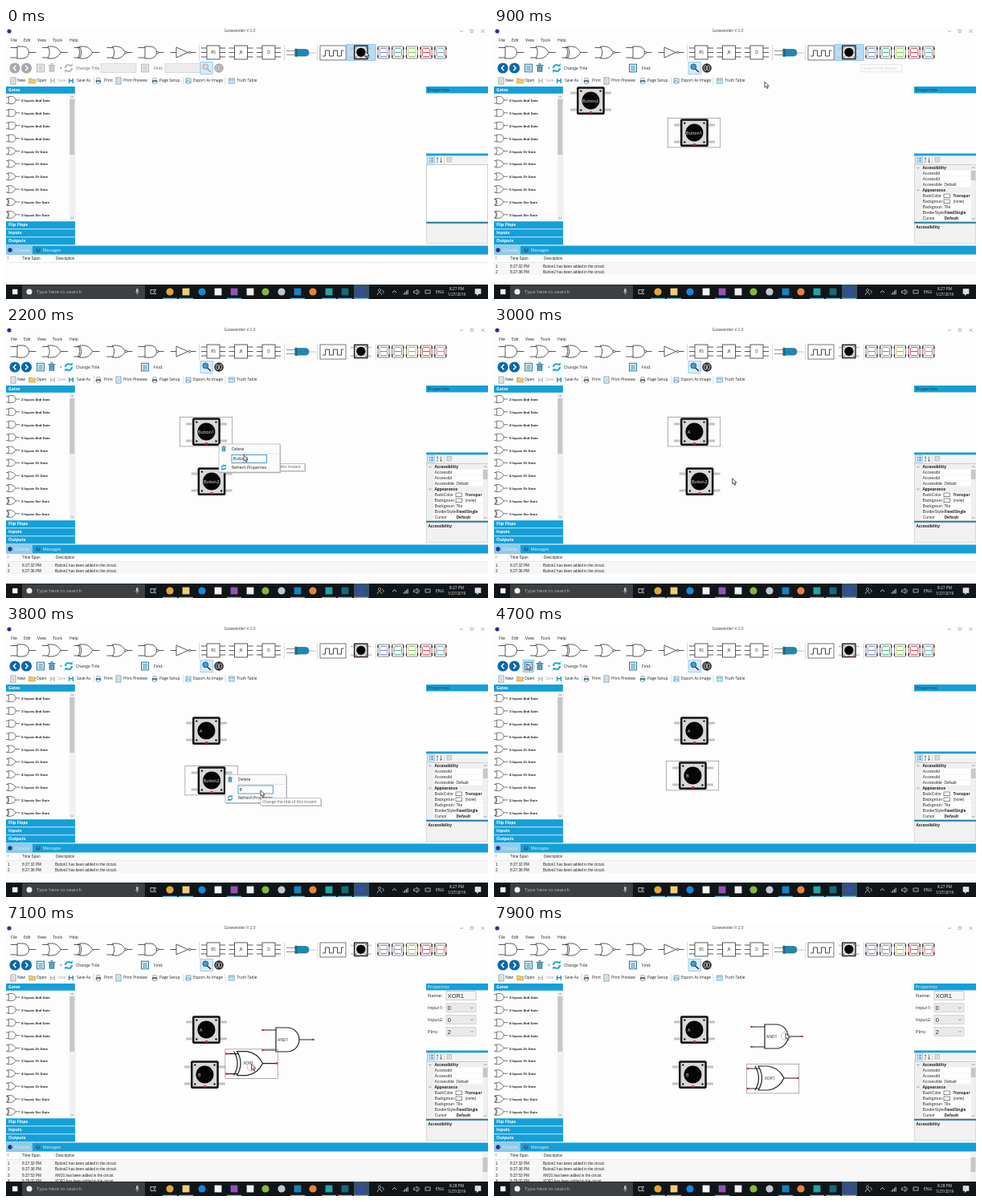
Recreate the animation shown at these times as an HTML page. Size 600x338 px, loop 8 s.

```html
<!DOCTYPE html>
<html lang="en">
<head>
<meta charset="utf-8">
<title>Logic circuit editor</title>
<style>
html, body { margin: 0; width: 100%; height: 100%; overflow: hidden; background: #fdfdfd; }
svg { display: block; width: 100vw; height: 100vh; font-family: "Open Sans", "Noto Sans", sans-serif; }
text { white-space: pre; }
</style>
</head>
<body>
<svg viewBox="0 0 600 338" preserveAspectRatio="none">
  <g id="base"></g><g id="live"></g><g id="bar"></g><g id="top"></g>
</svg>
<script>
const LOOP = 8000, STEP = 100;
const BLUE = '#149fd8', INK = '#222', GREY = '#a8a8a8', PAPER = '#fdfdfd';
const $ = id => document.getElementById(id);

// Drawing helpers
const rect = (x, y, w, h, fill, stroke = 'none', sw = .6, rx = 0) =>
  `<rect x="${x}" y="${y}" width="${w}" height="${h}" fill="${fill}" stroke="${stroke}" stroke-width="${sw}" rx="${rx}"/>`;
const circle = (x, y, r, fill, stroke = 'none', sw = .6) =>
  `<circle cx="${x}" cy="${y}" r="${r}" fill="${fill}" stroke="${stroke}" stroke-width="${sw}"/>`;
const path = (d, stroke = INK, sw = .7, fill = 'none') =>
  `<path d="${d}" fill="${fill}" stroke="${stroke}" stroke-width="${sw}"/>`;
const text = (x, y, s, size = 4.9, fill = INK, extra = '') =>
  `<text x="${x}" y="${y + size * .36}" font-size="${size}" fill="${fill}" ${extra}>${s}</text>`;
const bold = (x, y, s, size = 4.9, fill = INK) => text(x, y, s, size, fill, 'font-weight="700"');
const sans = (x, y, s, size = 4.7, fill = INK) => text(x, y, s, size, fill, 'font-family="Liberation Sans, sans-serif"');
const at = (x, y, s, body) => `<g transform="translate(${x} ${y}) scale(${s})">${body}</g>`;
const chevron = (x, y, c = '#555') => path(`M${x - 1.7} ${y - .8}l1.7 1.7l1.7-1.7`, c, .6);

// Components are drawn in a 66 x 37 cell
const SHAPES = {
  and: 'M18 3H32A15 15 0 0 1 32 33H18Z',
  or: 'M15 3H27Q41 5 47 18Q41 31 27 33H15Q24 18 15 3Z',
  not: 'M16 5L45 18L16 31Z'
};
function gate(kind, sw = 1.3) {
  const negated = /^n/.test(kind);
  const shape = kind === 'not' ? 'not' : kind.includes('and') ? 'and' : 'or';
  const wires = shape === 'not' ? 'M1 18H16' : 'M1 6H18M1 31H18';
  return path(wires + `M${negated ? 52 : 47} 18H65`, '#222', sw)
    + path(SHAPES[shape], '#222', sw, '#fff')
    + (kind === 'xor' ? path('M11 3Q20 18 11 33', '#222', sw) : '')
    + (negated ? circle(49, 18, 2.7, '#fff', '#222', sw) : '');
}
function pushButton(label) {
  return path('M8 9H17M8 30H17M50 9H59M50 30H59', '#c2c2c2', 3)
    + rect(16, 1.3, 34.8, 34.6, '#141414', 'none', 0, 2) + rect(18.5, 3.8, 29.8, 29.6, '#d9d9d9')
    + [[21.3, 6.6], [45.5, 6.6], [21.3, 30.4], [45.5, 30.4]].map(p => circle(...p, 1.2, '#111')).join('')
    + circle(33.4, 18.5, 11, '#060606') + rect(32, 32.2, 3.2, 2.6, '#d8232a')
    + text(label.length > 1 ? 23.1 : 25, 19, label, 5.3, '#f2f2f2');
}
const placedGate = (kind, label) => gate(kind, 1.2)
  + [[1.5, 6], [1.5, 31], [64.5, 18]].map(p => circle(...p, 1.3, '#e02020')).join('')
  + text(kind === 'xor' ? 23 : 20, 18, label, 5);
const placed = (pos, body, selected) =>
  at(pos[0], pos[1], 1, body + (selected ? rect(.3, .3, 65.4, 36.6, 'none', '#8c8c8c', .7) : ''));

// Small toolbar icons
const sheet = (x, y, c) => rect(x - 3, y - 4, 6, 8, '#fff', c, .7) + path(`M${x - 1.7} ${y - 1.7}h3.4m-3.4 1.8h3.4m-3.4 1.8h3.4`, c, .5);
const board = (x, y, c) => rect(x - 4.5, y - 4.8, 9, 9.6, '#e6f2f9', c, 1) + path(`M${x - 2.8} ${y - 2}h5.6m-5.6 2.2h5.6m-5.6 2.2h5.6`, c, .9);
const disk = (x, y, c) => rect(x - 3, y - 3, 6, 6, c, 'none', 0, .5) + rect(x - 1.5, y - 3, 3, 2, '#fff') + rect(x - 1.8, y + .4, 3.6, 2.6, '#e8f4fb');
const printer = (x, y) => rect(x - 2, y - 3.2, 4, 2.5, '#fff', '#555', .5) + rect(x - 3.2, y - .9, 6.4, 3, '#47748f') + rect(x - 2, y + .8, 4, 2.4, '#fff', '#555', .5);
const trash = (x, y, c, k = 1) => at(x, y, k, path('M-3.2 -2.4h6.4m-4.4-1.4h2.4', c, 1.1) + rect(-2.4, -1.5, 4.8, 5, c) + path('M-.8 -1v4m1.6-4v4', '#fff', .5));
const cycle = (x, y, r, c) => path(`M${x - r} ${y}a${r} ${r} 0 0 1 ${1.7 * r} ${-.7 * r}M${x + r} ${y}a${r} ${r} 0 0 1 ${-1.7 * r} ${.7 * r}`, c, r * .55)
  + path(`M${x + r * .2} ${y - r * .5}h${r}v${-r}zM${x - r * .2} ${y + r * .5}h${-r}v${r}z`, 'none', 0, c);
const bar = (x, y, h) => path(`M${x} ${y}v${h}`, '#c4c4c4', .6);
const navDisc = (x, c, d) => circle(x, 50, 6.6, c) + path(`M${x - 1.4 * d} 46.8l${3 * d} 3.2l${-3 * d} 3.2`, '#fff', 1.5);

// A seven segment display: a on the bars, b on the sides
function digit(x, a, b) {
  return rect(x - 7, 23, 14, 15, '#fdfdfd', '#555', .7)
    + path(`M${x - 4} 25.3h8m-8 5.2h8m-8 5.2h8`, a, 1) + path(`M${x - 4.7} 26v9.3m9.4-9.3v9.3`, b, 1)
    + path(`M${x - 7} 24v3m0 7v3M${x + 7} 24v3m0 7v3`, '#222', 1.2);
}

function drawBase() {
  let s = rect(0, 0, 600, 338, PAPER);
  s += circle(4, 4, 2.6, '#27358c') + text(291, 3.2, 'Gatewelden V 2.0', 4.8, '#444', 'text-anchor="middle"')
    + path('M565 4h4M591.5 2l4 4m0-4l-4 4', '#777', .6) + rect(578.5, 2.7, 3, 3, 'none', '#777', .5);
  [['File', 6], ['Edit', 22], ['View', 39], ['Tools', 58], ['Help', 79]].forEach(([w, x]) => s += text(x, 14.7, w, 5));

  [['and', 5], ['or', 44.5], ['xor', 84], ['nor', 125], ['nand', 164], ['not', 204]]
    .forEach(([kind, x]) => s += at(x, 21.5, .5, gate(kind, 1.5)));
  [240.5, 346.5, 387.5, 460.5].forEach(x => s += bar(x, 21, 20));
  [['RS', 258], ['JK', 292.5], ['D', 327]].forEach(([w, x]) => {
    s += path(`M${x - 15} 25h30m-30 5.5h30m-30 5.5h30`, '#333', .8) + rect(x - 8, 22, 16, 17, '#fff', '#333', .8)
      + text(x, 30.5, w, 4.8, INK, 'text-anchor="middle"');
  });
  s += path('M349 28.5h12m-12 5h12', '#666', .7) + path('M377 31h9', '#aaa', .7)
    + path('M361 26.5h11.5q4.5 0 4.5 4.3t-4.5 4.3h-11.5z', '#176885', .6, '#2187ad') + rect(359.5, 25.8, 3, 10, '#176885');
  s += rect(391, 22, 32, 18, '#fff', '#555', .8) + path('M394 35h3.5v-7h5v7h5v-7h5v7h5v-7h3', '#333', .9);
  [['#7486d6', '#a2a5ce'], ['#4ab07a', '#9b82c4'], ['#7abf55', '#d0ce50'], ['#e33e55', '#d5536c'], ['#4fbfc1', '#e27878']]
    .forEach((c, i) => s += digit(470 + i * 17.7, ...c));

  s += sheet(9, 66, '#777') + path('M28.5 69v-6h3l1 1h4v5z', '#b28a32', .5, '#ecc968') + disk(58, 66, '#bcbcbc')
    + disk(81, 66, '#248fc4') + printer(115, 66) + sheet(140, 66, '#47748f') + printer(185, 66)
    + rect(224, 63, 6, 6, '#d8eef7', '#367fa2') + path('M224 68l2-3l1.5 2l1-1l1.5 2', '#367fa2', .6)
    + rect(277.5, 63, 7, 6, '#fff', '#367fa2') + path('M277.5 65h7m-4.7-2v6m2.4-6v6', '#367fa2', .5);
  [['New', 14], ['Open', 38], ['Save', 64], ['Save As', 88], ['Print', 122], ['Print Preview', 146], ['Page Setup', 191],
   ['Export As Image', 233], ['Truth Table', 287]].forEach(([w, x]) => s += text(x, 65.7, w, 4.9, w === 'Save' ? GREY : INK));
  [109.5, 221, 273].forEach(x => s += bar(x, 61, 10));

  s += rect(0, 73, 86, 8.8, BLUE) + bold(3, 77.3, 'Gates', 5.1, '#fff') + path('M86 73v198', '#c9d8e0', .5);
  const names = ['And', 'Or', 'Xor'];
  for (let i = 0; i < 10; i++) {
    const name = names[i >> 2], y = 90 + i * 15.87;
    s += at(-2, y - 5.4, .3, gate(name.toLowerCase(), 2)) + bold(19, y + .6, `${i % 4 + 2} Inputs ${name} Gate`, 4.05);
  }
  s += rect(79, 83, 6.5, 158, '#f0f0f0') + rect(79.3, 89, 6, 69, '#c6c6c6') + chevron(82.3, 237) + path('M80.6 87l1.7-1.7l1.7 1.7', '#555', .6);
  ['Flip Flops', 'Inputs', 'Outputs'].forEach((w, i) => s += rect(0, 241.2 + i * 10, 86, 9.2, BLUE) + bold(3, 245.3 + i * 10, w, 5.2, '#fff'));

  s += rect(523, 73, 77, 8.4, BLUE) + rect(523, 156.5, 77, 3, BLUE) + rect(523, 159.5, 77, 11, '#f3f3f3')
    + rect(524.5, 160, 9, 9, '#cfe6f6', '#7cb7de') + path('M527 163h1m1 0h3m-5 3h1m1 0h3', '#335', .8)
    + text(536, 163, 'A', 3.2) + text(536, 166.5, 'Z', 3.2) + path('M541.5 161.5v6m-1.3-1.5l1.3 1.5l1.3-1.5', '#333', .6)
    + bar(545.5, 161, 8) + rect(549, 161.5, 5.5, 5.5, '#ddd', '#999', .5)
    + rect(523.4, 170.4, 76.4, 71, '#fff', '#aaa', .6) + rect(523, 242, 77, 1.8, '#1a78a8') + rect(523.4, 244, 76.4, 25, '#f1f1f1', '#bbb', .5);

  s += rect(0, 271.5, 600, 11, BLUE) + rect(0, 272, 33, 10.5, '#8fcae8') + circle(5, 277, 2.7, '#27358c')
    + text(11, 277, 'Console', 4.9, '#e4f5fd') + circle(40, 277, 2.7, '#20679b') + text(39.2, 277, '?', 4, '#fff')
    + text(46, 277, 'Messages', 4.9, '#eef8fd')
    + sans(2, 287.5, '!') + sans(20, 287.5, 'Time Span') + sans(62, 287.5, 'Description')
    + path('M0 292.6h600M18 283v10M59 283v10', '#d8d8d8', .5);
  return s;
}

function drawTaskbar() {
  let s = rect(0, 320, 600, 18, '#101519') + rect(8, 325.8, 6.4, 6.4, '#f4f4f4') + rect(20, 320.5, 153, 17.5, '#3c4043')
    + circle(29, 329, 3.5, '#f0f0f0') + text(38, 328.8, 'Type here to search', 6.15, '#b9b9b9')
    + rect(162, 325, 2.6, 5, '#bbb', 'none', 0, 1.3) + path('M160.8 329q2.5 4 5 0m-2.5 2v2', '#bbb', .6)
    + rect(180, 326.5, 4.2, 5, 'none', '#eee', .7) + path('M186 325.5v3m0 1.5v2.5', '#eee', .9) + rect(433, 320, 19, 18, '#34536b');
  [['c', 204, '#e2a832'], ['s', 224, '#f0cf70'], ['c', 244, '#1688d8'], ['s', 264, '#f4f4f4'], ['s', 284, '#9353b5'],
   ['s', 304, '#eeeeee'], ['c', 323, '#83b83d'], ['c', 343, '#bfc9d0'], ['s', 363, '#1483c1'], ['c', 382, '#e5853b'],
   ['s', 402, '#21a6a5'], ['s', 422, '#16697a'], ['c', 442, '#364cae']].forEach(([k, x, c]) =>
    s += k === 'c' ? circle(x, 329, 4.6, c) : rect(x - 4.4, 324.6, 8.8, 8.8, c));
  [204, 224, 284, 363, 402, 422, 442].forEach(x => s += rect(x - 9, 336.8, 18, 1.2, '#75b7e6'));
  s += circle(465, 327, 1.6, 'none', '#ddd') + path('M462 333q3-7 6 0m0-6q3 1 2 4', '#ddd', .7)
    + path('M481 330l2.5-2.5l2.5 2.5', '#eee', .8) + path('M495 332.5v-1.5m1.7 1.5v-3m1.7 3v-4.5m1.7 4.5v-6', '#ddd', .9)
    + path('M507.5 328h2l2.5-2v6.5l-2.5-2h-2zM513.5 327q2 2 0 4.5', '#ddd', .7) + rect(522, 327, 6, 4, 'none', '#ddd', .7)
    + text(535, 328.8, 'ENG', 5.1, '#eee')
    + path('M584 325.5h7v6h-2.6l-2 2v-2h-2.4z', '#ddd', .7, '#ddd');
  return s;
}

// Motion: [time, x, y] points joined with a soft ease
function track(points, t) {
  const i = points.findIndex(p => p[0] > t);
  if (i === 0) return points[0].slice(1);
  if (i < 0) return points[points.length - 1].slice(1);
  const [t0, x0, y0] = points[i - 1], [t1, x1, y1] = points[i];
  let k = (t - t0) / (t1 - t0);
  k = k * k * (3 - 2 * k);
  return [x0 + (x1 - x0) * k, y0 + (y1 - y0) * k];
}
const POINTER = [[0, 447, 29], [100, 447, 29], [300, 120, 91], [550, 249, 131], [700, 447, 30], [750, 447, 30], [900, 337, 67],
  [1100, 120, 91], [1600, 255, 193], [1850, 265, 146], [2000, 268, 149], [2200, 296, 160], [2800, 298, 161], [2950, 305, 190],
  [3100, 273, 185], [3200, 273, 185], [3500, 317, 205], [3950, 317, 205], [4100, 256, 191], [4350, 248, 185], [4700, 41, 47],
  [4900, 20, 31], [5000, 20, 31], [5200, 120, 91], [5600, 351, 144], [6000, 29, 177], [6300, 27, 216], [6500, 27, 216],
  [6700, 120, 91], [7250, 347, 192], [7700, 361, 139], [7900, 363, 135]];
const START = [87, 72];
const TRACKS = {
  first: [[300, ...START], [550, 216, 112]],
  second: [[1100, ...START], [1600, 222.6, 174], [4100, 222.6, 174], [4350, 214, 168]],
  and: [[5200, ...START], [5600, 318, 125], [7700, 318, 125], [7900, 319, 121]],
  xor: [[6700, ...START], [7250, 314, 173]]
};
const LOG = [[150, '8:27:32', 'Button1'], [750, '8:27:36', 'Button2'], [5000, '8:27:53', 'AND1'], [6500, '8:28:00', 'XOR1']];
const DRAGS = [[300, 550], [1100, 1600], [2100, 2300], [4100, 4350], [5200, 5600], [6700, 7250], [7700, 8000]];
const within = (t, a, b) => t >= a && t < b;

function selection(t) {
  if (within(t, 1100, 1800) || within(t, 3100, 5000)) return 'second';
  return t < 5000 ? 'first' : t < 6500 ? 'and' : 'xor';
}

const tip = (x, y) => rect(x + 1, y + 1, 75, 9.2, '#bbb') + rect(x, y, 75, 9.2, '#fff', '#999', .6)
  + text(x + 2, y + 4.4, 'Change the title of this instant', 4.85, '#555');
function menu(x, y, value) {
  return rect(x + 1, y + 1, 76, 35.3, '#b5b5b5') + rect(x, y, 76, 35, '#fbfbfb', '#a5a5a5')
    + trash(x + 6, y + 6, '#2d82aa', .9) + text(x + 16, y + 6, 'Delete', 5.1) + path(`M${x + 15} ${y + 12}h60`, '#ccc', .5)
    + rect(x + 16, y + 13.5, 43.5, 10, '#fff', '#2788c2', .8) + text(x + 17.5, y + 18.4, value, 5.1)
    + cycle(x + 6, y + 29, 2.5, '#1796c8') + text(x + 16, y + 29, 'Refresh Properties', 5);
}

function secondRow(on, t) {
  const disc = on ? '#0a68aa' : '#a9a9a9', c = on ? '#28799f' : '#b4b4b4', field = x => on ? '' : rect(x, 44.5, 44, 11, '#ececec', '#c9c9c9', .6);
  const hot = within(t, 4600, 4850);
  return navDisc(11, disc, -1) + navDisc(25.5, disc, 1)
    + (hot ? rect(36, 42.5, 13.5, 15, '#c5e3f6', '#5aa9d8') : '') + board(43, 50, c) + trash(57, 50, c, 1.35)
    + path('M67 49.5h2.4l-1.2 1.4z', 'none', 0, '#444') + cycle(78, 50, 4, on ? '#29add1' : '#bbb')
    + text(87, 49.7, 'Change Title', 5.1, on ? INK : '#666') + field(118)
    + board(173, 50, c) + text(184, 49.7, 'Find:', 5.1, on ? INK : '#666') + field(198)
    + rect(242, 42.5, 15.5, 15, '#d7ebf8', '#71b6df') + path('M250.5 51l4.5 4', on ? '#333' : '#aaa', 1.6)
    + circle(248.3, 48.3, 3.4, on ? '#3f9fd0' : '#d6d6d6', on ? '#225b83' : '#aaa', 1)
    + circle(265, 50, 5.8, on ? '#2c2c30' : '#a8a8a8') + rect(261.6, 47, 2.8, 6, 'none', '#ddd', .8, 1.3) + rect(265.6, 47, 2.8, 6, 'none', '#ddd', .8, 1.3);
}

function propertyGrid() {
  let s = rect(523.7, 170.7, 9, 70, '#efefef');
  const rows = [['Accessibility'], ['Accessibl', ''], ['Accessibl', ''], ['Accessible', 'Default'], ['Appearance'], ['BackColor', 'Transpar', 1, 1],
    ['Backgroun', '(none)', 1], ['Backgroun', 'Tile'], ['BorderStyle', 'FixedSingle', 0, 1], ['Cursor', 'Default', 0, 1]];
  rows.forEach(([name, value, box, strong], i) => {
    const y = 174.3 + i * 7;
    if (value === undefined) {
      s += rect(524, y - 3.2, 70, 6.5, '#efefef') + chevron(528, y) + bold(533.5, y, name, 4.8);
      return;
    }
    s += path(`M533 ${y + 3.4}h61M559 ${y - 3.5}v7`, '#e6e6e6', .4) + sans(533.5, y, name, 5.1)
      + (box ? rect(560, y - 2.3, 7.5, 4.7, '#fff', '#444') : '') + (strong ? bold : sans)(box ? 571.5 : 560.5, y, value, 4.8);
  });
  return s + rect(593.5, 170.7, 6.2, 70.4, '#f0f0f0') + rect(593.8, 178, 5.6, 12, '#c6c6c6') + chevron(596.6, 238)
    + path('M594.9 175l1.7-1.7l1.7 1.7', '#555', .6) + bold(525.5, 248, 'Accessibility', 4.8);
}
function gateProperties(name) {
  let s = text(525, 88.3, 'Name:', 5.9) + rect(548, 82.7, 37, 10.6, '#f5f5f5', '#aaa') + sans(549.8, 88, name, 7.4);
  ['Input1:', 'Input2:', 'Pins:'].forEach((w, i) => {
    const y = 103.3 + i * 14.8;
    s += text(525, y, w, 5.9) + rect(548, y - 5.5, 37, 11, '#e9e9e9', '#c2c2c2') + sans(549.8, y, i < 2 ? '0' : '2', 7.4) + chevron(580, y);
  });
  return s;
}

function drawLive(t) {
  const on = t >= 150, chosen = selection(t), pos = k => track(TRACKS[k], t);
  let s = text(525, 77, 'Properties', 5.6, t < 5000 ? '#183c50' : '#f4fbff');
  if (t < 1200) s += rect(424.5, 20.5, 35, 20, '#b9ddf5', '#62b0e0');
  s += at(424.8, 20.9, .51, pushButton(''));
  if (within(t, 4850, 5150)) s += `<g opacity=".45">${rect(2, 20.5, 37, 20, '#9bd1f2', '#3c9bd4')}</g>`;
  s += secondRow(on, t);
  if (within(t, 800, 1000)) s += `<g opacity=".4">${rect(457, 45.8, 51, 9, '#fff', '#999') + text(460, 50.2, 'Insert Push Button', 4.8, '#888')}</g>`;

  if (on) s += placed(pos('first'), pushButton(t < 2900 ? 'Button1' : 'A'), chosen === 'first') + propertyGrid();
  if (t >= 750) s += placed(pos('second'), pushButton(t < 4000 ? 'Button2' : 'B'), chosen === 'second');
  if (t >= 5000) s += placed(pos('and'), placedGate('and', 'AND1'), chosen === 'and');
  if (t >= 6500) s += placed(pos('xor'), placedGate('xor', 'XOR1'), chosen === 'xor');
  if (t >= 5000) s += gateProperties(t < 6500 ? 'AND1' : 'XOR1');

  if (within(t, 1900, 2900)) s += (t >= 2100 ? tip(297, 170.3) : '') + menu(265, 146, t < 2500 ? 'Button1' : t < 2600 ? '' : 'A');
  if (within(t, 3200, 4000)) s += menu(273, 185.5, t < 3600 ? 'Button2' : t < 3700 ? '' : 'B') + (t >= 3500 ? tip(317, 214.8) : '');

  LOG.filter(row => t >= row[0]).forEach(([, time, name], i) => {
    const y = 297 + i * 7.5;
    s += rect(0, y - 3.8, 600, 7.2, '#f6f6f6') + sans(2, y, i + 1, 4.7) + sans(20, y, time + ' PM', 4.7)
      + sans(61, y, name + ' has been added in the circuit.', 4.6);
  });
  if (t >= 6500) s += rect(593, 283, 7, 37, '#f0f0f0') + rect(593.5, 290, 6, 18, '#c6c6c6');
  return s;
}

function drawTop(t) {
  const [x, y] = track(POINTER, t);
  const pressed = DRAGS.some(p => within(t, ...p));
  return text(561, 325, t < 6500 ? '8:27 PM' : '8:28 PM', 4.8, '#eee', 'text-anchor="middle"')
    + text(561, 332.4, '1/27/2019', 4.8, '#eee', 'text-anchor="middle"')
    + (pressed ? circle(x - .5, y + 3.5, 5, 'none', '#d9a0a0', .8) : '')
    + path(`M${x} ${y}v7.2l1.7-1.5l1.3 2.8l1.3-.6l-1.3-2.6h2.2z`, '#111', .7, '#fff');
}

$('base').innerHTML = drawBase();
$('bar').innerHTML = drawTaskbar();
let shown = -1;
function render(now) {
  const t = Math.floor(now % LOOP / STEP) * STEP;
  if (t !== shown) {
    shown = t;
    $('live').innerHTML = drawLive(t);
    $('top').innerHTML = drawTop(t);
  }
}
const origin = performance.now();
function tick() {
  render(performance.now() - origin);
  requestAnimationFrame(tick);
}
tick();
</script>
</body>
</html>
```
